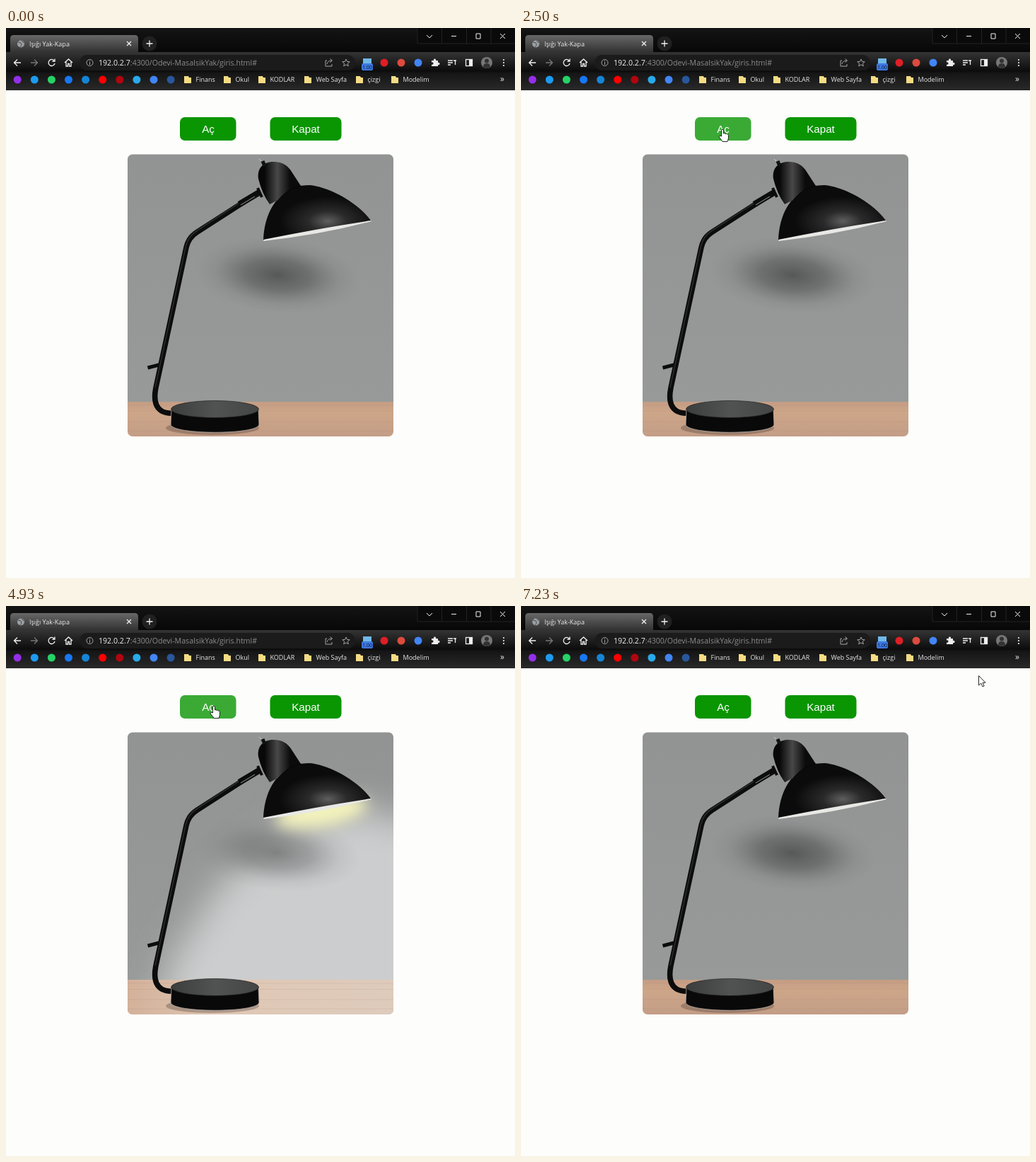
Write an HTML page that moves like this. It is 720 px wide and 777 px high and loops after 7.39 s.

```html
<!DOCTYPE html>
<html lang="tr">
<head>
<meta charset="utf-8">
<title>Lamp</title>
<style>
html, body { margin: 0; width: 100%; height: 100%; overflow: hidden; background: #fdfdfb; }
svg { display: block; }
.ui { font: 9px "Open Sans", sans-serif; fill: #e8e8e8; }
.url { font-size: 10.6px; fill: #8c8c8c; }
.line { fill: none; stroke: #f1f1f1; stroke-width: 1.3; }
.btn rect { fill: #0a9502; }
.btn.hover rect { fill: #3aaa35; }
.btn text { font: 15.2px "Liberation Sans", Arial, sans-serif; fill: #fff; text-anchor: middle; }
.lit { display: none; }
.on .lit { display: inline; }
.on .shadow { opacity: .65; }
</style>
</head>
<body>
<svg id="stage" width="720" height="777" viewBox="0 0 720 777">
  <defs>
    <linearGradient id="top" x2="0" y2="1"><stop stop-color="#141414"/><stop offset="1" stop-color="#070707"/></linearGradient>
    <linearGradient id="tab" x2="0" y2="1"><stop stop-color="#686868"/><stop offset="1" stop-color="#303030"/></linearGradient>
    <linearGradient id="bar" x2="0" y2="1"><stop stop-color="#343434"/><stop offset=".5" stop-color="#0c0c0c"/><stop offset=".55" stop-color="#151515"/><stop offset="1" stop-color="#292929"/></linearGradient>
    <linearGradient id="wall" x2="0" y2="1"><stop stop-color="#929493"/><stop offset="1" stop-color="#979a99"/></linearGradient>
    <linearGradient id="wood" x2="0" y2="1"><stop stop-color="#c49d84"/><stop offset=".3" stop-color="#cda689"/><stop offset="1" stop-color="#c39d86"/></linearGradient>
    <linearGradient id="woodLit"><stop stop-color="#d3b19a"/><stop offset=".35" stop-color="#dfc7b4"/><stop offset="1" stop-color="#decbbc"/></linearGradient>
    <radialGradient id="dome" cx=".6" cy=".66" r=".45"><stop stop-color="#5e5e5e"/><stop offset=".4" stop-color="#2a2a2a"/><stop offset="1" stop-color="#0b0b0b"/></radialGradient>
    <linearGradient id="cap"><stop offset=".15" stop-color="#080808"/><stop offset=".45" stop-color="#484848"/><stop offset=".75" stop-color="#0b0b0b"/></linearGradient>
    <linearGradient id="disc"><stop stop-color="#3c3d3d"/><stop offset=".5" stop-color="#515252"/><stop offset="1" stop-color="#444545"/></linearGradient>
    <radialGradient id="shade"><stop stop-color="#474949" stop-opacity=".8"/><stop offset=".4" stop-color="#505252" stop-opacity=".55"/><stop offset=".75" stop-color="#606262" stop-opacity=".14"/><stop offset="1" stop-color="#707272" stop-opacity="0"/></radialGradient>
    <filter id="soft" x="-40%" y="-40%" width="180%" height="180%"><feGaussianBlur stdDeviation="25"/></filter>
    <filter id="glow" x="-40%" y="-80%" width="180%" height="260%"><feGaussianBlur stdDeviation="10"/></filter>
    <clipPath id="photo"><rect x="172" y="178.500" width="376" height="398.500" rx="7"/></clipPath>
  </defs>

  <rect width="720" height="777" fill="#fdfdfb"/>

  <g id="browser">
    <rect width="720" height="35" fill="url(#top)"/>
    <path d="M6 35V15q0-5 5-5H182q5 0 5 5V35z" fill="url(#tab)"/>
    <rect y="34" width="720" height="54" fill="url(#bar)"/>
    <rect x="104" y="38" width="390" height="22" rx="11" fill="#1b1b1b"/>
    <rect x="582" width="138" height="22" fill="#0a0a0a"/>
    <path d="M582 0V22H720M616.5 0V22M651.5 0V22M686 0V22" stroke="#222" fill="none"/>
    <circle cx="21" cy="22.5" r="5" fill="#9a9fa3"/>
    <path d="M17 20l4 1 1 3-2 3M22 18l3 3" stroke="#4c4f52" fill="none"/>
    <circle cx="203" cy="22" r="10.5" fill="#202020"/>
    <g class="line">
      <path d="M171 19l6 6m0-6l-6 6M198.500 22h9m-4.500-4.500v9"/>
      <path d="M595 10l4 4 4-4M630 11.500h7M665 8h6v7h-6zM699 8l7 7m0-7l-7 7" stroke-width="1"/>
      <path d="M21 49H12m4-4.500L11.500 49l4.500 4.500M68 46a4.500 4.500 0 1 0 1 4M69 43.500V47h-3.500M83 49l5.500-5 5.500 5M85 48v6h2.500v-3.500h2V54H92v-6"/>
      <path d="M35 49h9m-4-4.500l4.500 4.500-4.500 4.500" stroke="#777"/>
      <g stroke="#a5a5a5" stroke-width="1">
        <circle cx="118.500" cy="49" r="4.500"/><path d="M118.500 48v4m0-6v1"/>
        <path d="M454 46h-2v8h9v-3M454 51q1-5 7-5m-2.500-2.500l3 2.500-3 2.500"/>
        <path d="M481 44l1.500 3.400 3.700.3-2.800 2.400.9 3.700-3.300-2-3.300 2 .9-3.700-2.800-2.400 3.700-.3z"/>
      </g>
      <path d="M625 46h7m-7 3h7m-7 3h4m6.500-6v6M633 46h4"/>
      <rect x="650.500" y="44.500" width="9" height="9"/>
    </g>
    <path d="M655 44h5v10h-5zM602 46h3a1.700 1.700 0 1 1 3 0h3v3a1.700 1.700 0 1 1 0 3v2h-9v-2.500a1.700 1.700 0 1 0 0-3z" fill="#eee"/>
    <rect x="505" y="43" width="12" height="8" fill="#70b8e8"/>
    <rect x="503" y="50" width="16" height="10" rx="2" fill="#3d78e0"/>
    <circle cx="680" cy="49" r="8" fill="#777"/>
    <path d="M675 55q0-5 5-5t5 5a8 8 0 0 1-10 0" fill="#333"/><circle cx="680" cy="46.500" r="3" fill="#333"/>
    <g fill="#eee"><circle cx="704" cy="45" r="1.100"/><circle cx="704" cy="49" r="1.100"/><circle cx="704" cy="53" r="1.100"/></g>
    <g class="ui">
      <text x="33" y="26">Işığı Yak-Kapa</text>
      <text class="url" x="131" y="53"><tspan fill="#f1f1f1">192.0.2.7</tspan>:4300/Odevi-MasaIsikYak/giris.html#</text>
      <text x="511" y="58" text-anchor="middle" style="font-size:7px;fill:#101a30">1.00</text>
      <text x="699" y="76" style="font-size:12px">»</text>
    </g>
  </g>

  <g class="btn" id="on"><rect x="246" y="126" width="79.500" height="33" rx="7"/><text x="286" y="148">Aç</text></g>
  <g class="btn" id="off"><rect x="373.500" y="126" width="101" height="33" rx="7"/><text x="424" y="148">Kapat</text></g>

  <g clip-path="url(#photo)">
    <rect x="172" y="178" width="376" height="351" fill="url(#wall)"/>
    <rect x="172" y="528" width="376" height="49" fill="url(#wood)"/>
    <g class="lit">
      <path d="M390 320L500 285 620 320V610H200L235 500 305 390z" fill="#cccdce" filter="url(#soft)"/>
      <rect x="172" y="528" width="376" height="49" fill="url(#woodLit)"/>
    </g>
    <path d="M172 533H548M172 541.500H548M172 556H548M172 569H548" stroke="#a87f6c" opacity=".15"/>
    <ellipse class="shadow" cx="384" cy="349" rx="118" ry="54" transform="rotate(5 384 349)" fill="url(#shade)"/>
    <ellipse class="lit" cx="446" cy="291" rx="66" ry="21" transform="rotate(-10 446 291)" fill="#f3f3bd" filter="url(#glow)"/>

    <ellipse cx="292" cy="565" rx="66" ry="10" fill="#40302a" opacity=".3"/>
    <g fill="none" stroke="#0c0c0c">
      <path d="M358 232L270 288.500Q258 296 255 310L212 508Q207 533 220 541Q227 545 238 544" stroke-width="7.600"/>
      <path d="M330 249L357 233" stroke-width="9"/>
      <path d="M200.500 480L220 475" stroke-width="5"/>
      <path d="M329 248L269 287Q257 295 254 310L211 508" stroke="#2c2c2c" stroke-width="1.500"/>
      <path d="M356 226l6 13" stroke-width="4"/>
      <path d="M332 250L352 238" stroke="#777" stroke-width="1.200"/>
    </g>
    <path d="M234 539L233 560C234 575 357 575 358 560L357 539z" fill="#090909" stroke="#b7afa9" stroke-width=".8"/>
    <ellipse cx="295.500" cy="538.500" rx="62" ry="12" fill="url(#disc)" stroke="#222" stroke-width=".7"/>

    <path d="M364 301L367 295 512 269 517 273Q446 292 364 301z" fill="#e8e8e5"/>
    <path d="M364 299C365 274 373 253 387 239C398 226 413 222 430 222C460 225 500 249 516 272Q443 283 364 299z" fill="url(#dome)"/>
    <path d="M357 213C355 198 364 189 378 189C392 189 399 195 404 203L417 223Q398 227 385 243L373 249Q362 234 357 213z" fill="url(#cap)"/>
    <path d="M385 243Q398 227 417 223" fill="none" stroke="#050505"/>
    <path d="M366 195L363 188" stroke="#111" stroke-width="5"/>
    <path d="M361 188l-3-3" stroke="#ddd" stroke-width=".8"/>
  </g>

  <g id="cursor" fill="#fff" stroke="#111" stroke-width=".9" stroke-linejoin="round">
    <path id="arrow" d="M.5.500V14l3.200-3 2.300 5 2.200-1-2.200-4.700H10z"/>
    <path id="hand" d="M-1.500 10V1.200Q0-1 1.500 1.200V6Q3 5 4 6.400Q5.500 5.500 6.500 7Q8.500 6.500 8.500 8.500V12Q8 15 7 17.500H0Q-1 15-5 11Q-5 8.300-1.500 10z"/>
  </g>
</svg>
<script>
const LOOP = 7390;
const $ = id => document.getElementById(id);
const browser = $('browser');

function add(tag, attrs, text = '') {
  const el = document.createElementNS('http://www.w3.org/2000/svg', tag);
  for (const name in attrs) el.setAttribute(name, attrs[name]);
  el.textContent = text;
  browser.append(el);
}

const dot = (cx, cy, fill) => add('circle', { cx, cy, r: 5.5, fill });
['#9330e8', '#1d9bf0', '#25d366', '#1877f2', '#1585d6', '#f00', '#b1060f', '#29a9ea', '#4285f4', '#28579b']
  .forEach((fill, i) => dot(16.2 + 24.1 * i, 73, fill));
['#e01e26', '#dd4b3e', '#4285f4'].forEach((fill, i) => dot(535 + 24 * i, 49, fill));

[[252, 'Finans'], [308, 'Okul'], [357, 'KODLAR'], [422, 'Web Sayfa'], [495, 'çizgi'], [545, 'Modelim']]
  .forEach(([x, label]) => {
    add('path', { d: `M${x} 68h6l1 2h3v8h-10z`, fill: '#f5dc83' });
    add('text', { class: 'ui', x: x + 16.5, y: 76 }, label);
  });

// Each move: start, end, target x, target y
const moves = [
  [30, 760, 70, 440], [800, 1530, 189, 377], [1760, 2260, 276, 172], [2300, 2500, 285, 143],
  [2760, 2960, 287, 142], [3100, 3440, 430, 145], [3440, 3630, 432, 142],
  [3950, 4150, 373, 143], [4190, 4360, 288, 143], [4730, 4900, 294, 141],
  [4960, 5360, 430, 140], [5960, 6080, 431, 138], [6130, 6660, 670, 99],
  [6700, 6830, 647, 99], [7160, 7190, 643, 98], [7190, 7230, 647, 98]
];

function pointer(t) {
  let x = -15, y = 470;
  for (const [start, end, tx, ty] of moves) {
    if (t <= start) break;
    const u = Math.min(1, (t - start) / (end - start));
    const s = u * u * (3 - 2 * u);
    x += (tx - x) * s;
    y += (ty - y) * s;
  }
  return [x, y];
}

function buttonAt([x, y]) {
  if (y < 126 || y > 159) return '';
  return x >= 246 && x <= 325.5 ? 'on' : x >= 373.5 && x <= 474.5 ? 'off' : '';
}

function draw() {
  const t = performance.now() % LOOP;
  const lit = (t >= 2760 && t < 3800) || (t >= 4500 && t < 5530);
  $('stage').classList.toggle('on', lit);

  // The browser reacts a little later than the pointer moves
  const hovered = buttonAt(pointer(t - 90));
  for (const id of ['on', 'off']) $(id).classList.toggle('hover', hovered === id);
  const isHand = buttonAt(pointer(t - 30)) !== '';
  $('hand').style.display = isHand ? '' : 'none';
  $('arrow').style.display = isHand ? 'none' : '';
  $('cursor').setAttribute('transform', `translate(${pointer(t)})`);
  requestAnimationFrame(draw);
}
draw();
</script>
</body>
</html>
```
